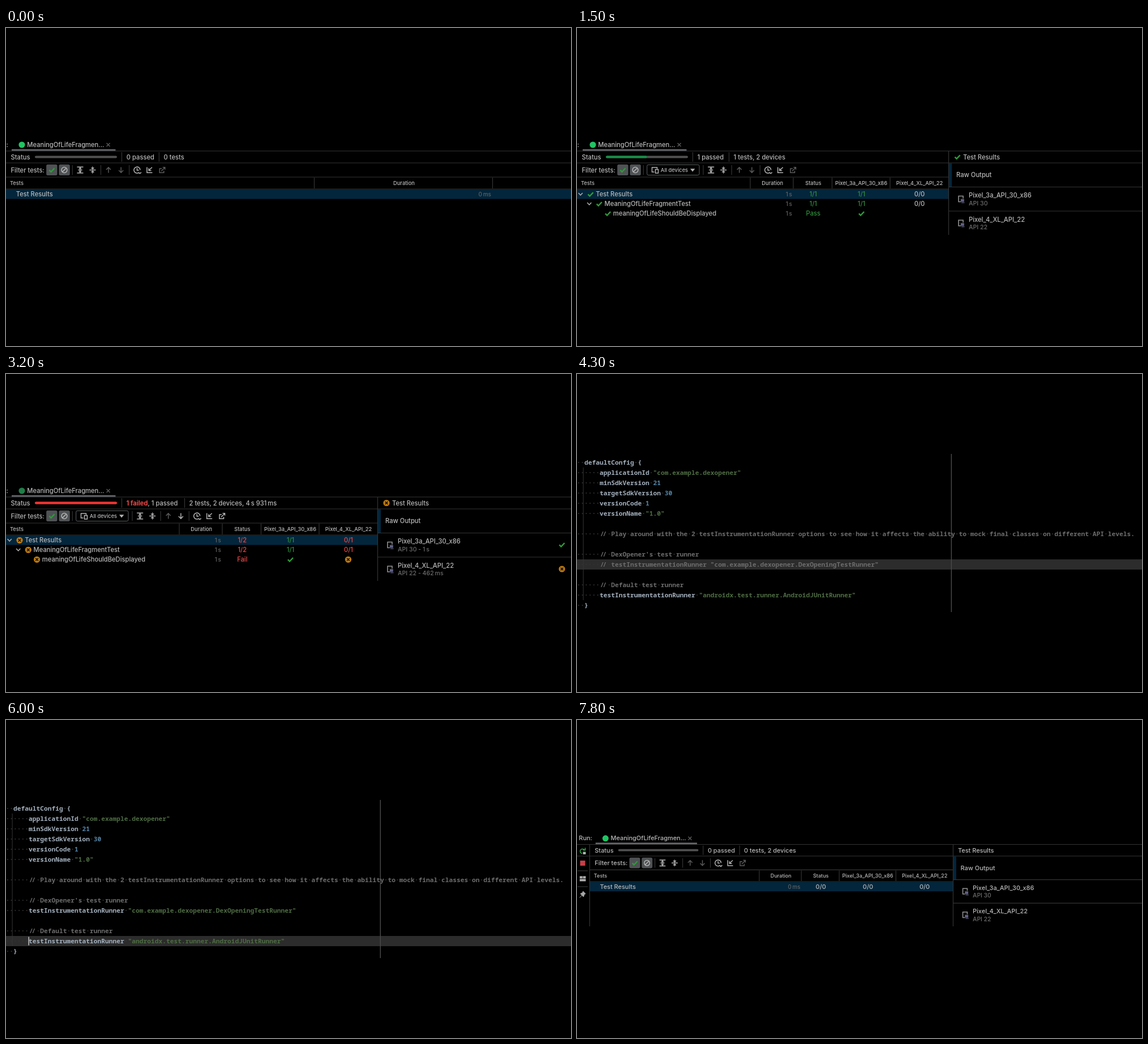
An HTML page for the animation above (8000 ms loop, 998 px wide and 561 px high).

```html
<!DOCTYPE html>
<html lang="en">
<head>
<meta charset="utf-8">
<title>Test run</title>
<style>
  html, body { margin: 0; width: 100%; height: 100%; overflow: hidden; background: #000; }
  svg { display: block; width: 998px; height: 561px; }
  text { font: 500 11.2px Inter, sans-serif; fill: #b9b9b9; white-space: pre; }
  .head { font-size: 9.3px; }
  .sub { font-size: 10.6px; fill: #6c6c6c; }
  .dur { font-size: 10px; fill: #626262; }
  .pass { fill: #2f8f3c; }
  .fail { fill: #ee4848; }
  .bold { fill: #f04848; font-weight: 700; }
  .mid { text-anchor: middle; }
  .end { text-anchor: end; }
  .code text { font: 600 11.25px "Noto Sans Mono", "DejaVu Sans Mono", monospace; fill: #a3b0bd; }
  .code .str { fill: #4d6c42; }
  .code .num { fill: #5585a8; }
  .code .rem { fill: #6c6c6c; }
  .code .dots { fill: #343434; }
  .rule { stroke: #343434; stroke-width: 1.2; }
  .icon { fill: none; stroke: #b4b4b4; stroke-width: 1.5; }
  .dim { stroke: #5a5a5a; }
</style>
</head>
<body>
<svg id="stage" viewBox="0 0 998 561"></svg>
<script>
const LOOP = 8000;

// Time windows in ms
const BARE = '0-300';
const READY = '300-700,7600-8000';
const RUNNING = '700-1200';
const PASSED = '1200-2300';
const FAILED = '2300-4000';
const TREE = '700-4000';
const SPLIT = '300-4000,7600-8000';
const IDLE = '0-1200,7600-8000';

const during = (on, ...kids) => `<g data-on="${on}">${kids.join('')}</g>`;
const at = (x, y, kids) => `<g transform="translate(${x} ${y})">${kids}</g>`;
const text = (x, y, str, cls = '') => `<text x="${x}" y="${y + 4}" class="${cls}">${str}</text>`;
const head = (x, str) => text(x, 273, str, 'head mid');
const rect = (x, y, w, h, fill, rx = 0) =>
  `<rect x="${x}" y="${y}" width="${w}" height="${h}" rx="${rx}" fill="${fill}"/>`;
const line = (x1, y1, x2, y2) => `<line x1="${x1}" y1="${y1}" x2="${x2}" y2="${y2}" class="rule"/>`;
const hline = (y, x1 = -30, x2 = 1000) => line(x1, y, x2, y);
const vline = (x, y1, y2) => line(x, y1, x, y2);
const icon = (x, y, d, cls = '') => at(x, y, `<path d="${d}" class="icon ${cls}"/>`);

const check = (x, y) =>
  at(x, y, '<path d="M-4.6 0L-1.5 3.2L4.6-3.2" fill="none" stroke="#2f9a3a" stroke-width="2.4"/>');
const cross = (x, y) => at(x, y,
  '<circle r="5.6" fill="#c27c0e"/><path d="M-2.4-2.4L2.4 2.4M2.4-2.4L-2.4 2.4" stroke="#111" stroke-width="1.5"/>');
const chevron = (x, y) => icon(x, y, 'M-3.6-2L0 2L3.6-2');

function tools(lit) {
  const dim = lit ? '' : 'dim';
  return vline(117.3, 242, 259) +
    icon(131, 250.5, 'M-5.5-5.3H5.5M-5.5 5.3H5.5M-3.5 0H3.5M0-4V-1M0 4V1M-2-2L0-4L2-2M-2 2L0 4L2 2') +
    icon(153, 250.5, 'M-5.5 0H5.5M0-6V-2M0 6V2M-2.4-4L0-1.8L2.4-4M-2.4 4L0 1.8L2.4 4') +
    vline(167.5, 242, 259) +
    icon(181, 250.5, 'M0 5V-4M-4-.5L0-4.6L4-.5', 'dim') +
    icon(203.2, 250.5, 'M0-5V4M-4 .5L0 4.6L4 .5', dim) +
    vline(217.6, 242, 259) +
    icon(231.5, 250.5, 'M2.8 4.8A5.5 5.5 0 1 1 5.5 0M0-3.5V.4H3.2M2.5 4L5 6.3L7.5 4') +
    icon(253.5, 250.5, 'M-4.5-5V4.8H5M4.5-4.8L-1 .5M-1.3-3V1H3') +
    icon(275.8, 250.5, 'M-.5-2.5H-4.5V4.8H3V1.5M-1.5 2L4.5-4M1-4.8H5V-.8', dim);
}

function device(y, name, api, time) {
  return at(678, y + 6.5,
    '<path d="M4-1V-5.2H-4V4.8H0" fill="none" stroke="#929292" stroke-width="1.6"/>' +
    rect(-.2, 0, 6, 5, '#5f5f86') + rect(1, 6, 5.5, 1, '#77779c')) +
    text(692, y, name) +
    during('300-2300,7600-8000', text(692, y + 13.5, api, 'sub')) +
    during(FAILED, text(692, y + 13.5, `${api} - ${time}`, 'sub'));
}

const counts = (y, a, b, c) =>
  text(417.3, y, a[0], 'mid ' + a[1]) + text(502.5, y, b[0], 'mid ' + b[1]) + text(605, y, c[0], 'mid ' + c[1]);

function treeMarks(mark) {
  return mark(24, 293.3) + mark(39.3, 310.3) + mark(54.6, 327.3);
}

function panel() {
  const ok = ['1/1', 'pass'], none = ['0/0', ''];
  return [
    // Tab
    text(4, 205.7, 'Run:', 'end'),
    during('0-2300,7600-8000', '<circle cx="28" cy="206" r="5.6" fill="#20c463"/>'),
    during(FAILED, '<circle cx="28" cy="206" r="5.6" fill="#1f7d48"/>'),
    text(37.3, 205.7, 'MeaningOfLifeFragmen...'),
    icon(180.6, 206, 'M-3-3L3 3M3-3L-3 3', 'dim'),
    hline(217),
    rect(10, 213.8, 183.5, 2.8, '#64676a'),

    // Status
    text(8.5, 227.5, 'Status'),
    rect(51, 225.4, 145, 4, '#515151', 2),
    during(PASSED, rect(51, 225.4, 72.5, 4, '#168f46', 2)),
    during(FAILED, rect(51, 225.4, 145, 4, '#f5322f', 2)),
    vline(204.5, 219, 236),
    during(IDLE, text(212.8, 227.5, '0 passed'), vline(270.4, 219, 236)),
    during(BARE, text(278.5, 227.5, '0 tests')),
    during(READY + ',' + RUNNING, text(278.5, 227.5, '0 tests, 2 devices')),
    during(PASSED, text(212.5, 227.5, '1 passed'), vline(268.5, 219, 236),
      text(276.6, 227.5, '1 tests, 2 devices')),
    during(FAILED, text(212.6, 227.5, '<tspan class="bold">1 failed</tspan>, 1 passed'),
      vline(315.5, 219, 236), text(323.5, 227.5, '2 tests, 2 devices, 4\u2009s 931\u2009ms')),
    hline(238),

    // Filter bar
    text(8.5, 250.7, 'Filter tests:'),
    rect(71.2, 240.8, 19.4, 19.2, '#4f5254', 2.5), check(81, 250.6),
    rect(93.4, 240.8, 19.4, 19.2, '#4f5254', 2.5),
    icon(103, 250.5, 'M-4.9 0A4.9 4.9 0 1 1 4.9 0A4.9 4.9 0 1 1-4.9 0M-3.4 3.4L3.4-3.4'),
    during('0-700,7600-8000', tools(false)),
    during(TREE, vline(117.3, 242, 259),
      '<rect x="123.7" y="241.2" width="92.3" height="18.4" rx="2.5" fill="none" stroke="#5e6163"/>',
      icon(137.5, 250.5, 'M4-2V-4.5H-5V3.5H-1M1-1H6V5.5H1Z'),
      text(147.8, 250.4, 'All devices', 'head'),
      '<path d="M200 248.2H208.4L204.2 253.4Z" fill="#b4b4b4"/>'),
    during('700-2300', at(105.7, 0, tools(false))),
    during(FAILED, at(105.7, 0, tools(true))),

    // Table head and selected row
    text(7, 273, 'Tests', 'head'),
    during(BARE, hline(263), hline(284), vline(544.5, 264, 283), vline(859.5, 264, 283),
      rect(-.5, 284.6, 1000, 17, '#03263c'), head(703, 'Duration'), text(857, 293.3, '0\u2009ms', 'dur end')),
    during(SPLIT, hline(263, -1, 656), hline(284, -1, 656),
      [306, 382, 450.5, 553].map(x => vline(x, 264, 283)).join(''),
      rect(-.5, 284.6, 656.5, 17, '#03263c'),
      head(345.3, 'Duration'), head(417.3, 'Status'),
      head(502, 'Pixel_3a_API_30_x86'), head(605, 'Pixel_4_XL_API_22')),
    during('0-700,7600-8000', text(17.8, 293.3, 'Test Results')),
    during(READY, text(380.3, 293.3, '0\u2009ms', 'dur end'), counts(293.3, none, none, none)),

    // Tree
    during(TREE, chevron(6.2, 293), chevron(21.7, 310),
      text(33.3, 293.3, 'Test Results'),
      text(48.5, 310.3, 'MeaningOfLifeFragmentTest'),
      text(63.8, 327.3, 'meaningOfLifeShouldBeDisplayed')),
    during(RUNNING, counts(293.3, none, none, none), counts(310.3, none, none, none)),
    during('1200-4000', [293.3, 310.3, 327.3].map(y => text(380, y, '1\u2009s', 'dur end')).join(''),
      check(502.5, 327.3)),
    during(PASSED, treeMarks(check), counts(293.3, ok, ok, none), counts(310.3, ok, ok, none),
      text(417.3, 327.3, 'Pass', 'mid pass')),
    during(FAILED, treeMarks(cross),
      [293.3, 310.3].map(y => counts(y, ['1/2', 'fail'], ok, ['0/1', 'fail'])).join(''),
      text(417.3, 327.3, 'Fail', 'mid fail'), cross(604.5, 327.3)),

    // Device list
    during(SPLIT, vline(656.5, 217, 365), rect(657, 238.5, 5, 41.5, '#03263c'),
      text(670, 259.2, 'Raw Output'), hline(280.5, 657), hline(323, 657),
      device(295.2, 'Pixel_3a_API_30_x86', 'API 30', '1\u2009s'),
      device(337.7, 'Pixel_4_XL_API_22', 'API 22', '462\u2009ms')),
    during('300-1200,7600-8000', text(665.3, 227.5, 'Test Results')),
    during('1200-4000', text(682, 227.5, 'Test Results')),
    during(PASSED, check(672, 227.5)),
    during(FAILED, cross(672, 227.5), check(982, 301.3), cross(982, 344))
  ].join('');
}

const sidebar = () => vline(22.4, 219.5, 364) + hline(266, 1, 19) + hline(294, 1, 19) +
  '<path d="M9 235.5A4 4 0 1 1 13 229.5M10.5 229.5H14.5V225.5" fill="none" stroke="#38a34c" stroke-width="1.6"/>' +
  rect(10.5, 232.5, 5, 4.5, '#a9b8ad') +
  rect(5.5, 248, 9, 9, '#c83f48') +
  rect(4.8, 275.5, 5, 4, '#b0b0b0') + rect(10.5, 275.5, 5, 4, '#b0b0b0') + rect(4.8, 280.5, 10.7, 4, '#b0b0b0') +
  '<path d="M10.5 302L15 306.5L13 307.5L11.5 312L6 306.5L10 304.5ZM4.5 313.5L9 309" fill="#a8a8a8" stroke="#a8a8a8"/>';

// Code editor
const CELL = 6.75, LEFT = -.5;
const rowY = n => 156 + 18 * n;
const colX = n => LEFT + CELL * n;

// Each part is [class, string]; spaces show as faint dots.
function code(row, indent, ...parts) {
  const all = ' '.repeat(indent) + parts.map(p => p[1]).join('');
  const spans = parts.map(([cls, str]) => {
    const body = str.startsWith('// ')
      ? '<tspan dx="1">/</tspan><tspan dx="-2.2">/</tspan><tspan dx="1.2"> </tspan>' + str.slice(3)
      : str;
    return `<tspan class="${cls}">${body}</tspan>`;
  }).join('');
  return text(LEFT, rowY(row), all.replace(/[^ ]/g, '\u00a0').replace(/ /g, '·'), 'dots') +
    text(colX(indent), rowY(row), spans);
}

function editor() {
  const rem = (row, str) => code(row, 6, ['rem', '// ' + str]);
  const set = (row, key, cls, val) => code(row, 6, ['', key + ' '], [cls, val]);
  const key = 'testInstrumentationRunner';
  const dex = '"com.example.dexopener.DexOpeningTestRunner"';
  const std = '"androidx.test.runner.AndroidJUnitRunner"';
  const bar = (on, row) => during(on, rect(0, rowY(row) - 9, 998, 18, '#2c2c2c'));
  const caret = (on, row, col) => during(on, rect(colX(col) - .5, rowY(row) - 7.5, 1.5, 15, '#c4c4c4'));
  return [
    bar('4000-5900', 10), bar('5900-6000', 12), bar('6000-7600', 13),
    rect(660.6, 141, 1.4, 279, '#4a4a4a'), rect(10.6, 165, 1, 234, '#353535'),
    code(0, 2, ['', 'defaultConfig {']),
    set(1, 'applicationId', 'str', '"com.example.dexopener"'),
    set(2, 'minSdkVersion', 'num', '21'),
    set(3, 'targetSdkVersion', 'num', '30'),
    set(4, 'versionCode', 'num', '1'),
    set(5, 'versionName', 'str', '"1.0"'),
    rem(7, `Play around with the 2 ${key} options to see how it affects the ability to mock final classes on different API levels.`),
    rem(9, "DexOpener's test runner"),
    during('4000-5500', rem(10, `${key} ${dex}`)),
    during('5500-7600', set(10, key, 'str', dex)),
    rem(12, 'Default test runner'),
    during('4000-6300', set(13, key, 'str', std)),
    during('6300-7600', rem(13, `${key} ${std}`)),
    code(14, 2, ['', '}']),
    caret('4600-5000,5200-5500', 10, 9), caret('5500-5900', 10, 6),
    caret('5900-6000', 12, 6), caret('6000-6300', 13, 6), caret('6300-6600,7100-7600', 13, 9)
  ].join('');
}

const stage = document.getElementById('stage');
stage.innerHTML =
  during('0-4000,7600-8000', `<g id="panel">${panel()}</g>`) +
  during('7600-8000', sidebar()) +
  `<g class="code">${during('4000-7600', editor())}</g>`;

const zoom = document.getElementById('panel');
const timed = [...stage.querySelectorAll('[data-on]')].map(el => ({
  el, spans: el.dataset.on.split(',').map(s => s.split('-').map(Number))
}));

function draw() {
  const t = performance.now() % LOOP;
  for (const { el, spans } of timed)
    el.style.display = spans.some(([a, b]) => t >= a && t < b) ? '' : 'none';
  zoom.setAttribute('transform', t < 7600 ? '' : 'matrix(.977 0 0 .977 23 7.5)');
  requestAnimationFrame(draw);
}
draw();
</script>
</body>
</html>
```
